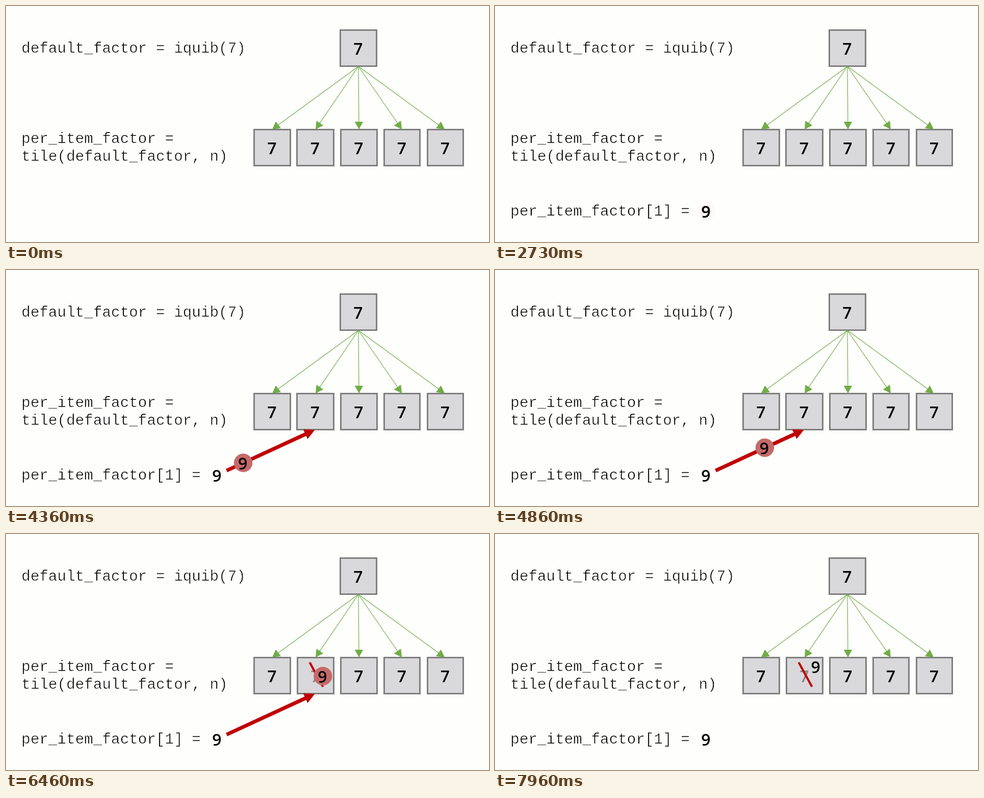
An HTML page that plays this animation: 947 by 465 pixels, repeating every 8 s.

```html
<!DOCTYPE html>
<html lang="en">
<head>
<meta charset="utf-8">
<title>Overriding one array item</title>
<style>
  html, body { margin: 0; width: 100%; height: 100%; overflow: hidden; background: #fefefd; }
  svg { display: block; width: 947px; height: 465px; }
  .code {
    font: 29.3px "Liberation Mono", monospace; white-space: pre;
    stroke: #fefefd; stroke-width: 0.7;
  }
  .digit { font: 600 32px "Open Sans", sans-serif; text-anchor: middle; }
  .cell { fill: #d9d9db; stroke: #7f7f7f; stroke-width: 3; }
</style>
</head>
<body>
<svg id="stage" viewBox="0 0 947 465"></svg>
<script>
const LOOP = 8000, GREEN = '#70ad47', RED = '#c00000';
const stage = document.getElementById('stage');

function add(parent, tag, attrs, text) {
  const el = document.createElementNS('http://www.w3.org/2000/svg', tag);
  for (const k in attrs) el.setAttribute(k, attrs[k]);
  if (text) el.textContent = text;
  parent.appendChild(el);
  return el;
}
const group = (attrs = {}) => add(stage, 'g', attrs);
const code = (parent, y, text) => add(parent, 'text', { class: 'code', x: 30.3, y }, text);
const digit = (parent, x, y, text, fill = '#000') =>
  add(parent, 'text', { class: 'digit', x, y, fill }, text);

function cell(parent, x, y, width, fill) {
  add(parent, 'rect', { class: 'cell', x, y, width, height: 71 });
  digit(parent, x + width / 2 - 0.7, y + 48.5, '7', fill);
}

function arrow(parent, [x1, y1], [x2, y2], color, width, length, half) {
  const d = Math.hypot(x2 - x1, y2 - y1);
  const ux = (x2 - x1) / d, uy = (y2 - y1) / d;
  const bx = x2 - ux * length, by = y2 - uy * length;
  add(parent, 'line', { x1, y1, x2: bx + ux, y2: by + uy, stroke: color, 'stroke-width': width });
  add(parent, 'polygon', {
    points: [[x2, y2], [bx - uy * half, by + ux * half], [bx + uy * half, by - ux * half]].join(' '),
    fill: color
  });
}

// Static diagram
const base = group();
code(base, 92, 'default_factor = iquib(7)');
code(base, 270, 'per_item_factor =');
code(base, 305, 'tile(default_factor, n)');
cell(base, 655.5, 47.5, 71);
[[486.5, 71], [656.5, 71], [741.5, 70], [826.5, 70]].forEach(([x, w]) => cell(base, x, 243.5, w));
[522, 607, 692, 776, 860].forEach(x =>
  arrow(base, [691, 119], [x, 243], GREEN, 1.2, 15, 8.3));

// Animated parts
const oldCell = group();
cell(oldCell, 570.5, 243.5, 72);

const assign = group();
code(assign, 413, 'per_item_factor[1] =');
digit(assign, 413.5, 416.5, '9');

const newCell = group();
cell(newCell, 571.5, 243.5, 71, '#8a8a8a');
add(newCell, 'line', { x1: 595.5, y1: 253, x2: 621.5, y2: 301, stroke: RED, 'stroke-width': 4.2 });

const clip = add(add(stage, 'clipPath', { id: 'wipe' }), 'rect', { x: 425, y: 300, width: 0, height: 110 });
const redArrow = group({ 'clip-path': 'url(#wipe)' });
arrow(redArrow, [432.5, 395.3], [605.6, 314.9], RED, 7.2, 20.5, 10.5);

const token = group();
const disc = add(token, 'circle', { r: 18.2, fill: '#c56a6a' });
digit(token, -1, 12.8, '9');

const ramp = (t, from, to) => Math.min(1, Math.max(0, (t - from) / (to - from)));
const opacity = (el, v) => el.setAttribute('opacity', v);

// Constant speed with a soft first and last quarter
function ease(u, a = 0.25) {
  if (u > 0.5) return 1 - ease(1 - u, a);
  const v = 1 / (1 - a);
  return u < a ? v * u * u / (2 * a) : v * (u - a / 2);
}

function draw(t) {
  const assigned = t >= 1200 ? 1 : 0;
  opacity(assign, assigned);
  opacity(token, assigned);

  clip.setAttribute('width', 185 * ramp(t, 3470, 3700));
  opacity(redArrow, 1 - ramp(t, 7460, 7950));

  const swap = ramp(t, 5670, 5970);
  opacity(newCell, swap);
  opacity(oldCell, swap < 1 ? 1 : 0);

  const p = ease(ramp(t, 3715, 5715)), q = ease(ramp(t, 5850, 6850));
  const x = 414.5 + 191.5 * p + 23.7 * q;
  const y = 403.7 - 89.7 * p - 52.5 * q;
  token.setAttribute('transform', `translate(${x} ${y})`);
  opacity(disc, ramp(t, 2715, 3150) * (1 - ramp(t, 6880, 7380)));
}

const start = performance.now();
function tick() {
  draw((performance.now() - start) % LOOP);
  requestAnimationFrame(tick);
}
tick();
</script>
</body>
</html>
```
